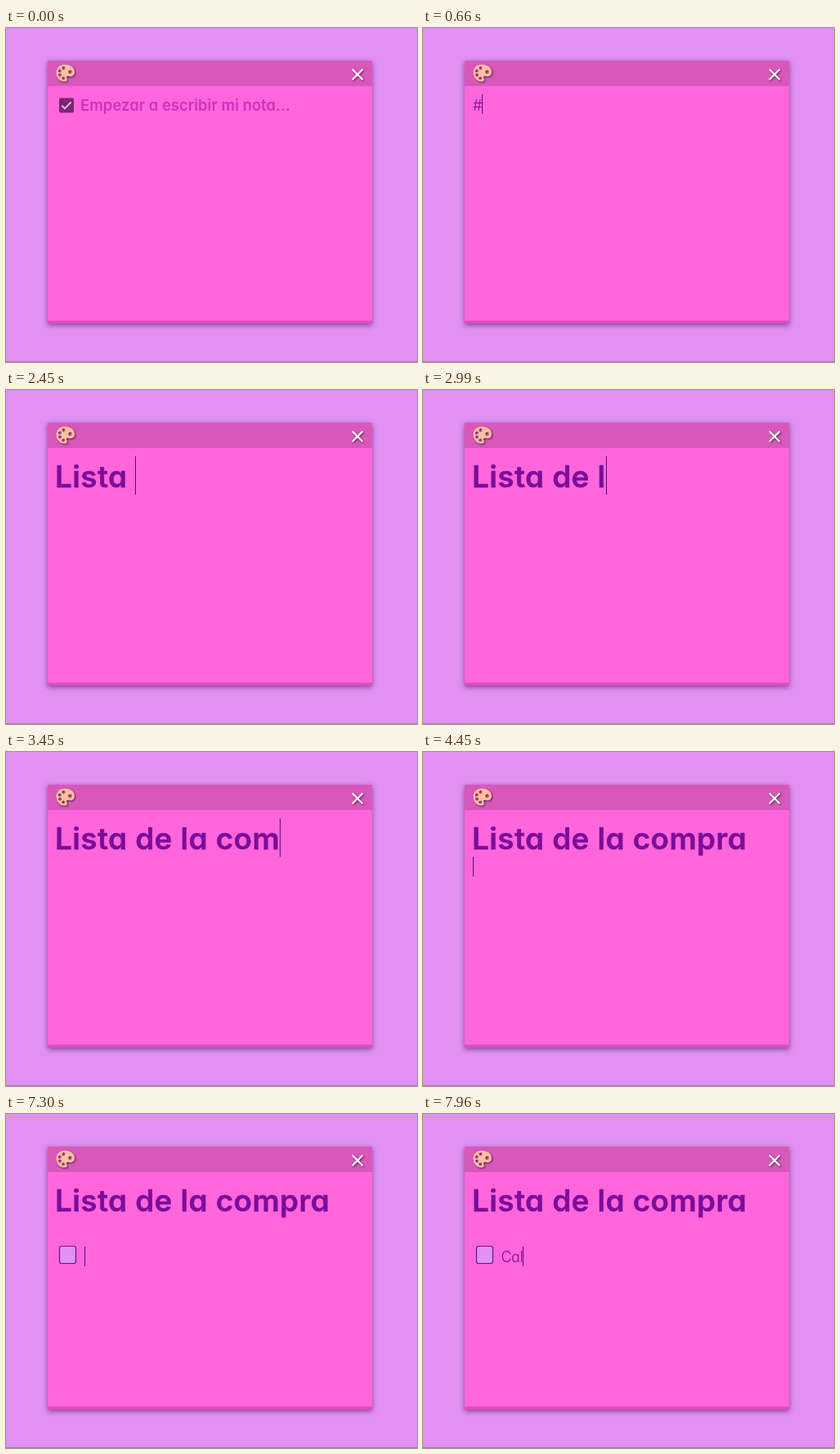
An HTML page for the animation above (8000 ms loop, 503 by 408 pixels).

```html
<!DOCTYPE html>
<html lang="es">
<head>
<meta charset="utf-8">
<title>Nota</title>
<style>
  html, body { margin: 0; width: 100%; height: 100%; overflow: hidden; background: #e091f1; }
  svg { display: block; width: 503px; height: 408px; }
  text {
    font-family: Inter, "Open Sans", sans-serif;
    font-feature-settings: "cv11", "ss03";
    white-space: pre;
    fill: #7b0d99;
  }
  #title { font-size: 37px; font-weight: 600; letter-spacing: .35px; stroke: #7b0d99; stroke-width: .4; stroke-linejoin: round; }
  #body { font-size: 18px; font-weight: 300; letter-spacing: -.5px; }
  #hint text { font-size: 18.5px; font-weight: 600; fill: #c934bd; }
  .note { filter: drop-shadow(0 2px 3px rgba(60, 10, 80, .6)); }
  .icon { filter: drop-shadow(1px 1px 1px rgba(50, 10, 50, .75)); }
</style>
</head>
<body>
<svg viewBox="0 0 503 408">
  <rect width="503" height="408" fill="#e091f1"/>
  <rect y="407" width="503" height="1" fill="#a878b4"/>
  <g class="note">
    <rect x="51" y="40" width="397" height="321" fill="#ff66dc"/>
  </g>
  <rect x="51" y="40" width="397" height="31" fill="#d957bb"/>
  <rect x="51" y="357.5" width="397" height="3.5" fill="#d94fbd"/>

  <g class="icon">
    <path fill="#fcbf9f" fill-rule="evenodd" d="M72 44.5C66 44.5 61.5 48.5 61.5 54.5C61.5 61 66 65.5 72 65.5C74.5 65.5 75.5 63.5 74.5 61.8C73.2 59.5 74.5 58.2 77 58.8C81 60 84 58 84 54C84 48 78.5 44.5 72 44.5Z
      M68.6 49a1.9 1.9 0 1 0 3.8 0a1.9 1.9 0 1 0 -3.8 0Z
      M63.9 52.5a1.9 1.9 0 1 0 3.8 0a1.9 1.9 0 1 0 -3.8 0Z
      M64.2 57.5a1.9 1.9 0 1 0 3.8 0a1.9 1.9 0 1 0 -3.8 0Z
      M68.3 61.3a1.9 1.9 0 1 0 3.8 0a1.9 1.9 0 1 0 -3.8 0Z
      M76.3 53.8a2.2 2.2 0 1 0 4.4 0a2.2 2.2 0 1 0 -4.4 0Z"/>
  </g>
  <path class="icon" d="M424.5 51L436 62.5M436 51L424.5 62.5" stroke="#fff" stroke-width="2.2" stroke-linecap="round"/>

  <g id="hint">
    <rect x="65" y="85.5" width="18" height="18" rx="2" fill="#79286e"/>
    <path d="M68.3 94.7L72 98.3L79.6 90.5" fill="none" stroke="#f3b0ea" stroke-width="1.9"/>
    <text x="91" y="101">Empezar a escribir mi nota...</text>
  </g>
  <text id="title"></text>
  <rect id="box" x="65.5" y="161.5" width="20" height="21" rx="2.5" fill="#e091f1" stroke="#65148a" stroke-width="1.2"/>
  <text id="body"></text>
  <rect id="caret" width="1" fill="#5c0a7c"/>
</svg>
<script>
const LOOP = 8000;
const $ = id => document.getElementById(id);
const TITLE = "Lista de la compra";

// Text origin, baseline and caret box for each kind of line
const lines = {
  plain: { el: "body",  x: 61, y: 101, top: 81,  h: 24 },
  head:  { el: "title", x: 60, y: 119, top: 81,  h: 47 },
  gap:   { el: "body",  x: 61, y: 149, top: 128, h: 24 },
  item:  { el: "body",  x: 61, y: 173, top: 152, h: 24 },
  check: { el: "body",  x: 95.5, y: 181, top: 162, h: 24 }
};

// [time, line, text, caret shown]
const steps = [
  [0, "plain", "", 0], [530, "plain", "", 1],
  [660, "plain", "#", 1], [1190, "plain", "#", 0],
  [1330, "head", "", 1]
];
const keys = [[1720, 1], [1990, 3], [2120, 4], [2320, 5], [2450, 6], [2590, 7], [2660, 8],
  [2790, 9], [2990, 10], [3050, 11], [3110, 12], [3250, 13], [3320, 14], [3450, 15],
  [3580, 16], [3710, 17], [3910, 18]];
keys.forEach(([t, n]) => steps.push([t, "head", TITLE.slice(0, n), 1]));
steps.push(
  [4450, "gap", "", 1],
  [4840, "item", "", 1], [5370, "item", "", 0], [5900, "item", "", 1],
  [5970, "item", "[", 1], [6240, "item", "[]", 1], [6770, "item", "[]", 0],
  [7300, "check", "", 1], [7700, "check", "C", 1], [7890, "check", "Ca", 1], [7960, "check", "Cal", 1]
);

const show = (id, on) => $(id).setAttribute("visibility", on ? "visible" : "hidden");
function place(id, attrs) {
  for (const k in attrs) $(id).setAttribute(k, attrs[k]);
}

let last;
function draw(t) {
  const step = steps.findLast(s => s[0] <= t);
  if (step === last) return;
  last = step;
  const [time, kind, str, on] = step;
  const line = lines[kind], el = $(line.el);
  $("body").textContent = "";
  $("title").textContent = time < 1330 ? "" : TITLE;
  place("title", { x: lines.head.x, y: lines.head.y });
  el.textContent = str;
  place(line.el, { x: line.x, y: line.y });
  const end = str ? line.x + el.getComputedTextLength() : Math.max(line.x, 61);
  place("caret", { x: Math.round(end), y: line.top, height: line.h });
  show("caret", on);
  show("hint", time < 660);
  show("box", kind === "check");
}

const start = performance.now();
function tick() {
  draw((performance.now() - start) % LOOP);
  requestAnimationFrame(tick);
}
draw(0);
tick();
</script>
</body>
</html>
```
